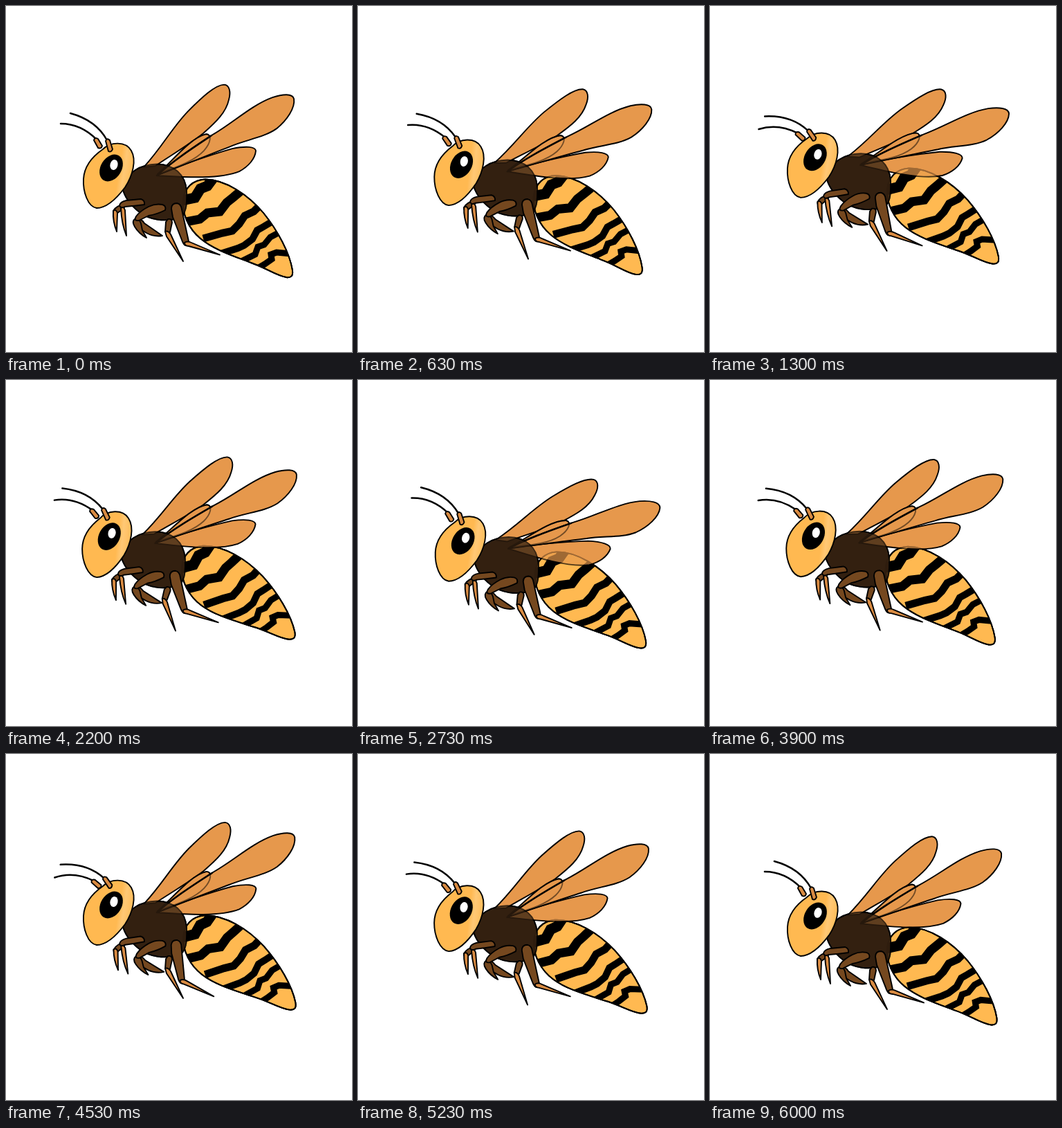
An HTML page for the animation above (6030 ms loop, 500 px wide and 500 px high).

```html
<!DOCTYPE html>
<html lang="en">
<head>
<meta charset="utf-8">
<title>Flying hornet</title>
<style>
html, body { margin: 0; width: 100%; height: 100%; overflow: hidden; background: #fff; }
svg { display: block; width: 500px; height: 500px; stroke: #000; stroke-width: 1.9; stroke-linejoin: round; stroke-linecap: round; }
.line { fill: none; stroke-width: 2.5; }
.stripes { fill: none; stroke-linejoin: miter; stroke-linecap: butt; }
.skin { fill: #ffb951; }
.dark { fill: #332010; }
.brown { fill: #75481f; }
.tan { fill: #d98b42; }
.wing { fill: #e6984c; }
</style>
</head>
<body>
<svg viewBox="0 0 500 500">
  <defs>
    <linearGradient id="face" x1="0" y1="0.4" x2="1" y2="0.6">
      <stop offset="0.68" stop-color="#ffb951"/>
      <stop offset="0.78" stop-color="#ffc875"/>
      <stop offset="1" stop-color="#ffb951"/>
    </linearGradient>
    <path id="belly" d="M256 280 C258 263 270 251 288 250.500 C318 251 350 273 372 299 C393 325 410 357 414 382 C415 390 412 393 405 392 C391 390 375 378 354 371 C328 361 300 352 281 336 C264 322 254 300 256 280Z"/>
    <path id="chest" d="M168 262 C175 240 194 229 218 228.500 C243 229 259 243 261 267 C262 288 260 303 249 307 C228 312 207 309 193 298 C180 288 171 276 168 262Z"/>
    <path id="lobe" d="M219 243 C237 228 266 190 289 185 C298 185 296 198 286 209 C270 226 242 234 219 243Z"/>
    <clipPath id="cut"><use href="#belly"/></clipPath>
  </defs>

  <g id="body">
    <g id="abdomen">
      <use href="#belly" class="skin"/>
      <g class="stripes" clip-path="url(#cut)">
        <path stroke-width="15" d="M300 248 L291 260 L281 264 L273 277 L250 282"/>
        <path stroke-width="13" d="M342 265 L329 276 L319 284 L309 297 L291 299 L280 308 L255 313"/>
        <path stroke-width="11" d="M370 285 L358 297 L345 303 L337 315 L327 325 L313 328 L285 336"/>
        <path stroke-width="10" d="M387 310 L372 319 L363 324 L356 337 L344 346 L335 350 L310 358"/>
        <path stroke-width="9" d="M399 325 L382 334 L373 345 L364 348 L360 359 L340 369"/>
        <path stroke-width="9" d="M412 358 L391 356 L383 359 L384 366 L374 373 L362 380"/>
      </g>
      <use href="#belly" fill="none"/>
    </g>
    <use href="#chest" class="dark"/>

    <path id="backWing" class="wing" d="M199 233 C227 202 239 177 263 152 C283 132 302 114 315 113.500 C323 114 325 124 322 135 C318 154 303 168 285 184 C262 202 238 216 216 231Z"/>
    <g id="wings">
      <use href="#lobe" class="wing"/>
      <path class="wing" d="M218 245 C251 230 299 214 327 206 C347 202 360 203 361 209 C360 221 350 232 337 239 C307 251 255 247 218 245Z"/>
      <path class="wing" d="M218 245 C241 224 272 203 300 185 C329 168 355 143 385 132 C400 127 414 126 416 134 C418 147 406 165 391 177 C373 190 347 193 324 203 C290 216 249 233 218 245Z"/>
      <path class="line" d="M218 245 C241 224 270 205 297 187"/>
      <use href="#lobe" fill="none" stroke-opacity=".5"/>
    </g>

    <!-- the body shows faintly through the wings -->
    <use href="#abdomen" opacity=".3"/>
    <use href="#chest" class="dark" opacity=".75"/>

    <g id="midLeg">
      <path class="brown" d="M234 308 Q240 307 240 313 L237 327 Q233 331 230 326 L231 312Z"/>
      <path class="tan" d="M230 326 Q234 324 238 330 L256 369 L232 333Z"/>
    </g>
    <g id="hindLeg">
      <path class="brown" d="M239 293 Q239 285 247 285 Q253 286 254 294 L264 340 Q265 347 259 346 Q256 344 254 338 L241 305Z"/>
      <path class="tan" d="M258 342 Q262 339 268 342 L309 359.500 L264 347 Q258 347 258 342Z"/>
    </g>
    <g id="frontLegs">
      <path class="brown" d="M188 310 Q194 305 200 314 L226 332 Q214 334 203 328 L187 318 Q182 314 188 310Z"/>
      <path class="brown" d="M187 307 Q192 306 195 314 L197 324 L203 335 Q192 329 186 319 Q181 311 187 307Z"/>
      <path class="brown" d="M226 287 Q232 289 230 295 Q218 301 206 303 L192 310 Q184 311 188 304 Q194 296 206 290 Q216 285 226 287Z"/>
      <path class="brown" d="M170 287 Q174 290 168 294 L160 300 Q154 302 155 296 Q160 288 170 287Z"/>
      <path class="tan" d="M155 296 Q159 293 161 299 L160 326 Q154 311 155 296Z"/>
      <path class="tan" d="M166 292 Q170 289 172 295 L174 332 Q167 315 166 292Z"/>
      <path class="brown" d="M195 279 Q201 281 200 287 Q186 289 172 290 Q165 293 164 288 Q165 283 174 281Z"/>
    </g>

    <g id="head">
      <path fill="url(#face)" d="M140 207 C151 196 173 195 181 209 C189 223 183 245 172 262 C160 278 146 292 131 292 C118 290 111 268 112 250 C113 232 124 218 140 207Z"/>
      <ellipse cx="152" cy="234" rx="14" ry="20" transform="rotate(32 152 234)"/>
      <ellipse cx="156" cy="229.500" rx="5.500" ry="7.500" fill="#fff" stroke="none" transform="rotate(15 156 229.500)"/>
      <g id="feelers">
        <path class="line" d="M146 194 Q130 165 93 155"/>
        <path class="line" d="M131 193 Q108 170 79 170"/>
        <path class="tan" d="M127 194 Q128 189 133 192 L139 202 Q138 207 133 205Z"/>
        <path class="tan" d="M144 195 Q146 190 150 194 L154 207 Q152 212 148 210Z"/>
      </g>
    </g>
  </g>
</svg>
<script>
const TOTAL = 6030, CYCLE = 3030, FLAPS = 4;
const part = id => document.getElementById(id);
const turn = (id, angle, x, y) =>
  part(id).setAttribute("transform", `rotate(${angle} ${x} ${y})`);
const start = performance.now();

function draw() {
  const t = (performance.now() - start) % TOTAL % CYCLE;
  const w = t / CYCLE * 2 * Math.PI;
  const lift = (1 - Math.cos(w)) / 2;
  const sway = Math.sin(w) ** 4;
  const flap = 18 * (1 - Math.abs(t / CYCLE * FLAPS % 1 * 2 - 1));
  const kick = Math.exp(-(((t - 1600) / 250) ** 2));

  part("body").setAttribute("transform", `translate(${-2.3 * sway} ${-16 * lift})`);
  turn("abdomen", 2.1 * (Math.cos(w - 0.94) - Math.cos(0.94)), 258, 275);
  turn("backWing", flap, 200, 233);
  turn("wings", flap, 217, 243);
  turn("head", -3 * sway, 178, 245);
  turn("feelers", 5 * sway - 19 * lift, 148, 208);
  turn("frontLegs", -3 * lift, 205, 288);
  turn("midLeg", 9 * sway, 234, 312);
  turn("hindLeg", 8 * kick, 247, 290);
  requestAnimationFrame(draw);
}

draw();
</script>
</body>
</html>
```
